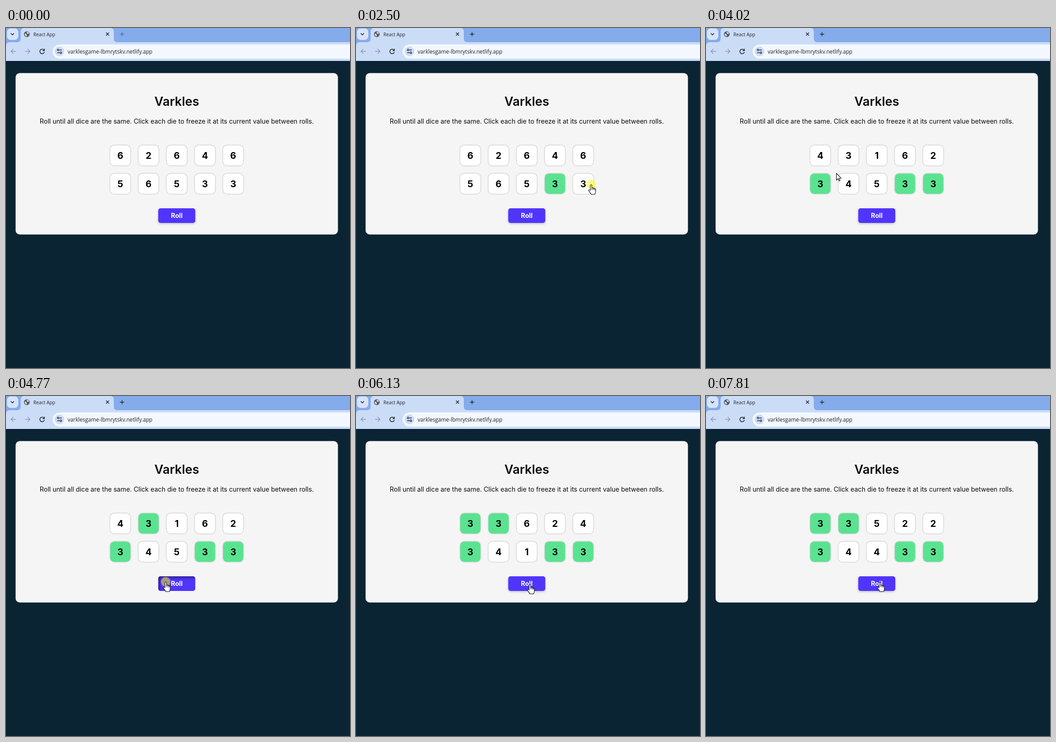
An HTML page with a canvas that plays this animation: 753x743 px, repeating every 8 s.

```html
<!DOCTYPE html>
<html lang="en">
<head>
<meta charset="utf-8">
<title>Dice game</title>
<style>
html, body { margin: 0; width: 100%; height: 100%; overflow: hidden; background: #0b2434; }
canvas { display: block; width: 753px; height: 743px; }
</style>
</head>
<body>
<canvas id="stage" width="753" height="743"></canvas>
<script>
const ctx = document.getElementById('stage').getContext('2d');
const LOOP = 8000;
const HOLD = 80;        // how long a click is held down
const ZOOM = 0.8824;    // page zoom, sizes below are CSS pixels times this
const CENTER = 373.8;
const INTER = 'Inter, sans-serif';
const UI = '"Open Sans", sans-serif';
const INK = '#1f2328';
const BUTTON = { x: CENTER - 40.5, y: 394, w: 81, h: 32 };
const DIE = 50 * ZOOM, PITCH = 70 * ZOOM;

// Each step moves the pointer to (x, y) and ends at `up`, clicking a die to
// freeze it or rolling new digits for the dice still free.
// `go` and `at` bound the move; by default it fills the time before the click.
const steps = [
  { go: 190, at: 860, up: 1140, x: 408, y: 412 },
  { at: 1560, up: 2160, x: 447, y: 341, die: 8 },
  { up: 2570, x: 515, y: 342, die: 9 },
  { at: 2850, up: 3050, x: 381, y: 403, roll: '43162345' },
  { go: 3190, up: 3750, x: 258, y: 342, die: 5 },
  { up: 4430, x: 318, y: 286, die: 1 },
  { up: 4840, x: 350, y: 406, roll: '314545' },
  { up: 5470, x: 272, y: 291, die: 0 },
  { go: 5660, at: 5870, up: 6130, x: 381, y: 411, roll: '62441' },
  { go: 6340, at: 6480, up: 6880, x: 381, y: 406, roll: '11662' },
  { up: 7280, x: 381, y: 406, roll: '45146' },
  { up: 7810, x: 381, y: 406, roll: '52244' }
];

const clamp = v => Math.max(0, Math.min(1, v));

function stateAt(t) {
  const dice = [...'6264656533'].map(value => ({ value, frozen: false }));
  const state = { dice, x: 699, y: 735, shown: t >= steps[0].go, press: null };
  let last = 0;
  for (const s of steps) {
    const { go = last, at = s.up - HOLD, up } = s;
    const k = clamp((t - go) / (at - go));
    state.x += (s.x - state.x) * k;
    state.y += (s.y - state.y) * k;
    if (t < up) {
      if (t >= up - HOLD && (s.roll || 'die' in s)) state.press = s;
      break;
    }
    if ('die' in s) dice[s.die].frozen = true;
    if (s.roll) dice.filter(d => !d.frozen).forEach((d, i) => { d.value = s.roll[i]; });
    last = up;
  }
  return state;
}

function box(x, y, w, h, r, color) {
  ctx.beginPath();
  ctx.roundRect(x, y, w, h, r);
  ctx.fillStyle = color;
  ctx.fill();
}

function disc(x, y, r, color) {
  ctx.beginPath();
  ctx.arc(x, y, r, 0, Math.PI * 2);
  ctx.fillStyle = color;
  ctx.fill();
}

function text(str, x, y, font, color, align = 'center') {
  ctx.font = font;
  ctx.fillStyle = color;
  ctx.textAlign = align;
  ctx.fillText(str, x, y);
}

function stroke(d, color, width = 1.5) {
  ctx.strokeStyle = color;
  ctx.lineWidth = width;
  ctx.stroke(new Path2D(d));
}

function setShadow(color, blur, offset = 0) {
  ctx.shadowColor = color;
  ctx.shadowBlur = blur;
  ctx.shadowOffsetY = offset;
}

const clearShadow = () => setShadow('transparent', 0);

const dieSpot = i => ({
  x: CENTER + (i % 5 - 2) * PITCH - DIE / 2,
  y: 256.4 + Math.floor(i / 5) * PITCH,
  w: DIE, h: DIE
});

const inside = (r, p) => p.x >= r.x - 1 && p.x <= r.x + r.w + 1 && p.y >= r.y - 1 && p.y <= r.y + r.h + 1;

function drawBrowser(t) {
  const strip = '#84abea', bar = '#cbdcf7', faded = '#8b98b0';
  box(0, 0, 753, 40, 0, strip);
  box(0, 31, 753, 41, [8, 0, 0, 0], bar);
  box(2, 1, 25, 25, 8, '#d6e3fa');
  stroke('M10.5 11.5 L14 15 L17.5 11.5', INK, 1.6);

  ctx.fillStyle = bar;
  ctx.fill(new Path2D('M24 31 Q32 31 32 23 V8 Q32 0 40 0 H228 Q236 0 236 8 V23 Q236 31 244 31 Z'));

  disc(45.5, 13.5, 6.3, '#565b63');
  ctx.fillStyle = bar;
  ctx.fill(new Path2D('M41 12 L44 13 L46 16 L44.5 18.5 Q40.5 17 41 12 Z M45 8.5 L49 9 L50.5 12 L47 13 L45.5 11 Z'));

  text('React App', 60, 18, '10.2px ' + UI, INK, 'left');
  stroke('M219 10 L225.5 16.5 M225.5 10 L219 16.5', INK);
  stroke('M249.5 13.5 H258.5 M254 9 V18', t < 2300 ? '#5264b4' : INK, 1.4);

  stroke('M21.5 51 H11.5 M16 46 L11 51 L16 56', faded);
  stroke('M42 51 H52 M47.5 46 L52.5 51 L47.5 56', faded);
  stroke('M83 48 A5 5 0 1 0 84 52.5 M84 45.5 V49.5 H80', INK, 1.6);

  box(102, 36, 680, 31, 15.5, '#f4f8fe');
  disc(117, 51, 10.5, bar);
  stroke('M117 48 H122 M112 54 H117', INK, 1.4);
  stroke('M112.2 48 a1.8 1.8 0 1 0 3.6 0 a1.8 1.8 0 1 0 -3.6 0 M118.2 54 a1.8 1.8 0 1 0 3.6 0 a1.8 1.8 0 1 0 -3.6 0', INK, 1.3);
  text('varklesgame-lbmrytskv.netlify.app', 135, 55.5, '11.7px ' + UI, INK, 'left');
}

function drawDie({ value, frozen }, i) {
  const { x, y, w, h } = dieSpot(i);
  setShadow('rgba(0,0,0,.15)', 2);
  box(x - 1, y - 1, w + 2, h + 2, 10, '#d4d4d4');
  clearShadow();
  box(x, y, w, h, 9, frozen ? '#59e391' : '#fff');
  text(value, x + w / 2, y + 29.4, '700 20px ' + INTER, '#000');
}

function drawButton(down) {
  const { x, y, w, h } = BUTTON;
  if (!down) setShadow('rgba(0,0,0,.22)', 5, 2);
  box(x, y, w, h, 5, '#5035ff');
  clearShadow();
  if (down) {
    // inner shadow, cast by a frame just outside the button
    ctx.save();
    ctx.beginPath();
    ctx.roundRect(x, y, w, h, 5);
    ctx.clip();
    setShadow('rgba(0,0,0,.7)', 9, 4);
    ctx.shadowOffsetX = 4;
    ctx.beginPath();
    ctx.rect(x - 30, y - 30, w + 60, h + 60);
    ctx.roundRect(x - 3, y - 3, w + 6, h + 6, 5);
    ctx.fillStyle = '#000';
    ctx.fill('evenodd');
    ctx.restore();
  }
  text('Roll', CENTER, 414.5, `700 ${16 * ZOOM}px ${INTER}`, '#fff');
}

const arrow = new Path2D('M.5 .5 V15.5 L4 12.2 L6.3 17.3 L8.6 16.3 L6.4 11.3 H11 Z');
const hand = new Path2D('M-2 13 V2 Q-2 .5 -.3 .5 Q1.4 .5 1.4 2 V8 Q1.6 6.8 3 7 Q4.4 7.2 4.4 8.6 ' +
  'Q4.6 7.6 6 7.9 Q7.2 8.2 7.2 9.6 Q7.6 8.8 8.6 9.2 Q9.6 9.6 9.5 11 V15 Q9.4 18 7.8 21.5 H-.4 ' +
  'Q-1.6 18.8 -3.6 16.4 L-5.4 13.6 Q-6 12.2 -4.8 11.6 Q-3.6 11.2 -2 13 Z');

function drawPointer(state) {
  const hover = inside(BUTTON, state) || state.dice.some((_, i) => inside(dieSpot(i), state));
  const shape = hover ? hand : arrow;
  if (state.press) disc(state.x - 0.5, state.y, 10.5, 'rgba(255,255,0,.5)');
  ctx.save();
  ctx.translate(Math.round(state.x), Math.round(state.y));
  ctx.lineJoin = 'round';
  ctx.fillStyle = '#fff';
  ctx.fill(shape);
  ctx.strokeStyle = '#000';
  ctx.lineWidth = 1.1;
  ctx.stroke(shape);
  if (hover) stroke('M1.4 8 V11.5 M4.4 8.6 V12 M7.2 9.6 V12.5', '#000', 1);
  ctx.restore();
}

function draw(t) {
  const state = stateAt(t);
  box(0, 0, 753, 743, 0, '#0b2434');
  drawBrowser(t);
  box(21, 98.6, 705.6, 352.6, 9, '#f5f5f5');
  text('Varkles', CENTER, 169.5, '600 27px ' + INTER, '#0b0b0b');
  text('Roll until all dice are the same. Click each die to freeze it at its current value between rolls.',
    CENTER, 209, `${16 * ZOOM}px ${INTER}`, '#0b0b0b');
  state.dice.forEach(drawDie);
  drawButton(state.press && state.press.roll);
  if (state.shown) drawPointer(state);
}

const start = performance.now();
function tick() {
  draw((performance.now() - start) % LOOP);
  requestAnimationFrame(tick);
}
tick();
</script>
</body>
</html>
```
